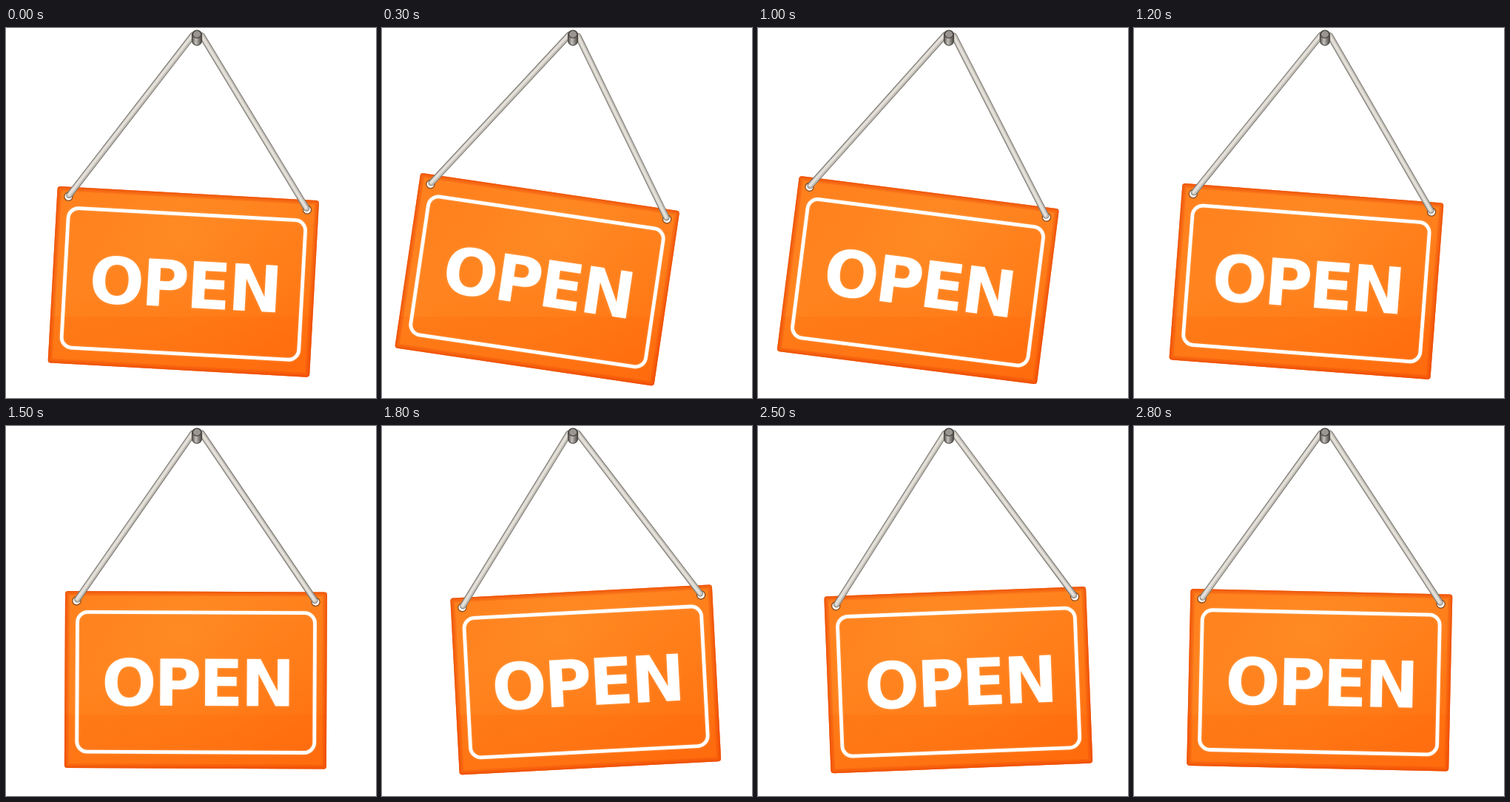
Write an HTML page with a canvas that moves like this. It is 500x500 px and loops after 2900 ms.

```html
<!DOCTYPE html>
<html lang="en">
<head>
<meta charset="utf-8">
<title>Swinging sign</title>
<style>
  html, body { margin: 0; width: 100%; height: 100%; overflow: hidden; background: #fff; }
  canvas { display: block; width: 500px; height: 500px; }
</style>
</head>
<body>
<canvas id="stage" width="500" height="500"></canvas>
<script>
const ctx = document.getElementById('stage').getContext('2d');
const LOOP = 2900, STEP = 100;
const PIVOT = { x: 258, y: 13 };

// Swing angle in degrees over the loop: [ms, degrees]
const SWING = [[0, 3.15], [300, 8.4], [600, 10.5], [700, 10.45], [1200, 4.35],
               [1800, -3], [2200, -4.3], [2400, -3], [2800, 1.25]];

function key(i) {
  const n = SWING.length;
  const [t, a] = SWING[(i + n) % n];
  return [t + Math.floor(i / n) * LOOP, a];
}

function slope(i) {
  const [t0, a0] = key(i - 1), [t1, a1] = key(i), [t2, a2] = key(i + 1);
  const before = t1 - t0, after = t2 - t1;
  return (after * (a1 - a0) / before + before * (a2 - a1) / after) / (before + after);
}

// Smooth periodic curve through the swing keys
function angleAt(t) {
  let i = 0;
  while (key(i + 1)[0] <= t) i++;
  const [t0, a0] = key(i), [t1, a1] = key(i + 1);
  const h = t1 - t0, u = (t - t0) / h, v = 1 - u;
  return a0 * (1 + 2 * u) * v * v + a1 * u * u * (3 - 2 * u)
       + h * u * v * (v * slope(i) - u * slope(i + 1));
}

function gradient(g, stops) {
  for (const [at, color] of stops) g.addColorStop(at, color);
  return g;
}

// The light stays fixed on the stage while the board swings
const light = gradient(ctx.createLinearGradient(190, 190, 330, 490), [
  [0, '#ff811e'], [0.3, '#ff841f'], [0.65, '#ff7b18'], [1, '#ff6e10']
]);
const glow = gradient(ctx.createRadialGradient(235, 280, 10, 235, 280, 190), [
  [0, 'rgba(255,146,42,.4)'], [1, 'rgba(255,130,30,0)']
]);
const metal = gradient(ctx.createLinearGradient(251, 0, 265, 0), [
  [0, '#4c4945'], [0.4, '#c4c0ba'], [0.65, '#8c8882'], [1, '#403d3a']
]);

function roundRect(x, y, w, h, r) {
  ctx.beginPath();
  ctx.roundRect(x, y, w, h, r);
}

function boardPath() {
  roundRect(-177, 210.8, 354, 239, 4);
}

function swingSpace(angle) {
  ctx.translate(PIVOT.x, PIVOT.y);
  ctx.rotate(angle);
}

function drawBoard(angle) {
  ctx.save();
  swingSpace(angle);
  boardPath();
  ctx.clip();
  ctx.rotate(-angle);
  ctx.translate(-PIVOT.x, -PIVOT.y);
  for (const paint of [light, glow]) {
    ctx.fillStyle = paint;
    ctx.fillRect(0, 0, 500, 500);
  }
  ctx.fillStyle = 'rgba(255,100,8,.25)';
  ctx.fillRect(0, 390, 500, 110);
  swingSpace(angle);
  ctx.strokeStyle = 'rgba(228,66,0,.24)';
  for (const w of [2, 4, 8, 12]) {
    boardPath();
    ctx.lineWidth = w;
    ctx.stroke();
  }
  ctx.restore();
}

function drawFace() {
  ctx.shadowColor = 'rgba(255,180,110,.6)';
  ctx.shadowBlur = 3;
  ctx.strokeStyle = ctx.fillStyle = '#fff';
  ctx.lineWidth = 4.8;
  roundRect(-160.3, 239, 321, 188.8, 14);
  ctx.stroke();
  ctx.font = 'bold 87px "DejaVu Sans", sans-serif';
  ctx.letterSpacing = '-3px';
  ctx.textAlign = 'center';
  ctx.fillText('OPEN', 2, 365);
  ctx.shadowColor = 'transparent';
}

function line(x0, y0, x1, y1, width, color) {
  ctx.beginPath();
  ctx.moveTo(x0, y0);
  ctx.lineTo(x1, y1);
  ctx.lineWidth = width;
  ctx.strokeStyle = color;
  ctx.stroke();
}

function drawRope(side) {
  const x = side * 161.5, y = 224;
  ctx.beginPath();
  ctx.arc(x, y, 5.6, 0, Math.PI * 2);
  ctx.fillStyle = '#fff';
  ctx.fill();
  ctx.lineWidth = 1.3;
  ctx.strokeStyle = '#8a4a1c';
  ctx.stroke();
  ctx.lineCap = 'round';
  const top = side * 6 + 0.5, end = x - side * 1;
  line(top, -3, end, y - 2, 8.6, '#797670');
  line(top, -3, end, y - 2, 6.6, '#c4c0b8');
  line(top - 0.6, -3.3, end - 0.6, y - 2.3, 3.4, '#e4e0da');
}

function drawNail() {
  roundRect(251.5, 3, 13, 20.5, 6.5);
  ctx.fillStyle = metal;
  ctx.fill();
  ctx.lineWidth = 1.2;
  ctx.strokeStyle = '#4b4844';
  ctx.stroke();
  ctx.beginPath();
  ctx.ellipse(258, 8.5, 5.6, 5, 0, 0, Math.PI * 2);
  ctx.fillStyle = '#9a968f';
  ctx.fill();
  ctx.stroke();
}

function draw(now) {
  const t = Math.floor((now % LOOP) / STEP) * STEP;
  const angle = angleAt(t) * Math.PI / 180;
  ctx.fillStyle = '#fff';
  ctx.fillRect(0, 0, 500, 500);
  drawBoard(angle);
  ctx.save();
  swingSpace(angle);
  drawFace();
  drawRope(-1);
  drawRope(1);
  ctx.restore();
  drawNail();
}

let start;
function tick(now) {
  start ??= now;
  draw(Math.max(0, now - start));
  requestAnimationFrame(tick);
}
draw(0);
requestAnimationFrame(tick);
</script>
</body>
</html>
```
